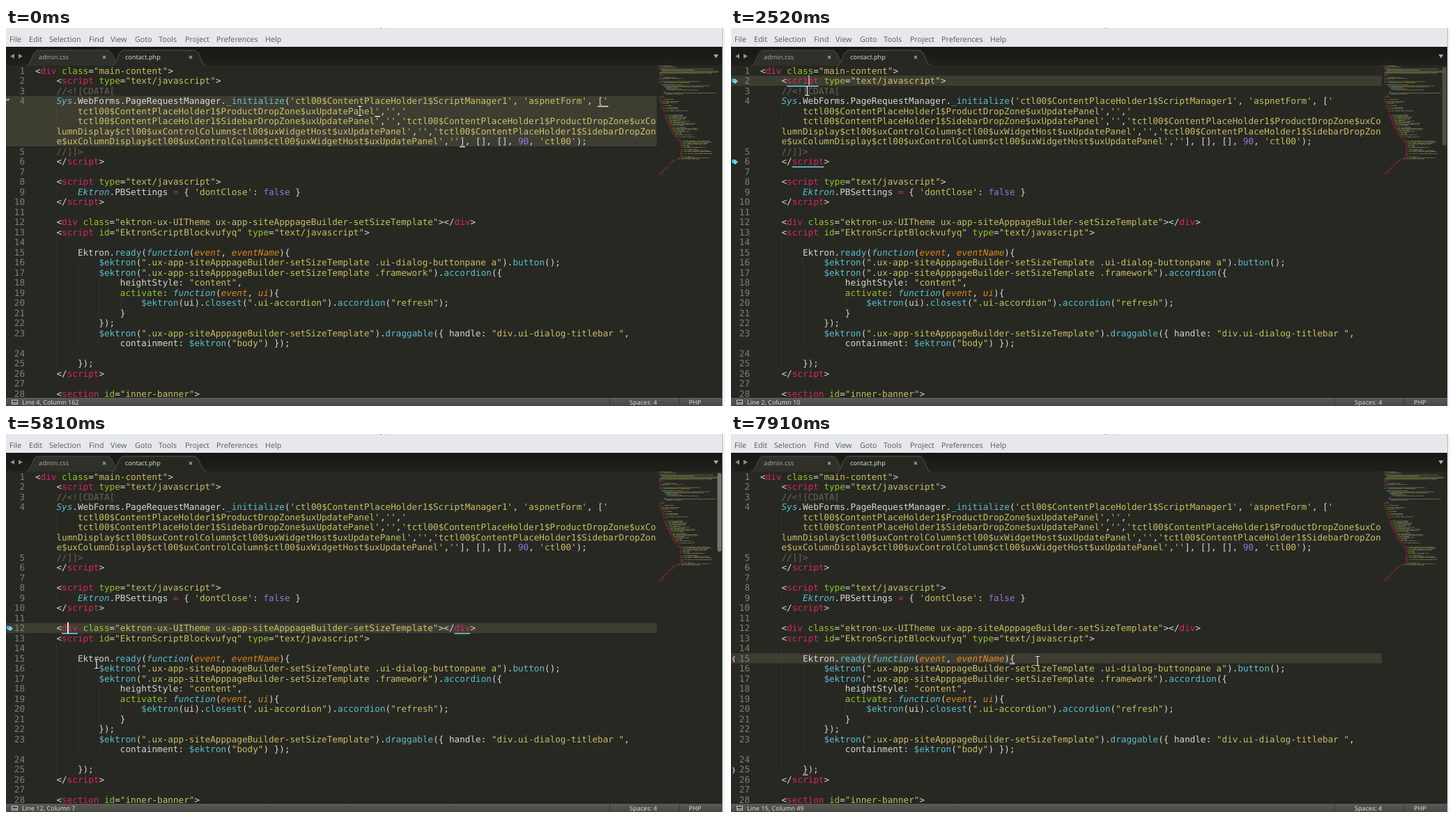
Recreate the animation shown at these times as an HTML page with a canvas. Size 1032 by 543 pixels, loop 8 s.

```html
<!DOCTYPE html>
<html lang="en">
<head>
<meta charset="utf-8">
<title>Code editor</title>
<style>
html, body { margin: 0; width: 100%; height: 100%; overflow: hidden; background: #272822; }
canvas { display: block; }
</style>
</head>
<body>
<canvas id="stage" width="1032" height="543"></canvas>
<script>
const ctx = document.getElementById('stage').getContext('2d');
const LOOP = 8000, TICK = 70;
const LEFT = 42, TOP = 54, ROW = 14.5, SIZE = 12.65, CELL = SIZE * 0.602;
const MENU_END = 27;
const MONO = '"DejaVu Sans Mono", monospace', SANS = '"Noto Sans", sans-serif';
const BACK = '#272822', BLUE = '#66d9ef';

// "~x" switches the colour; a leading "|" is a wrapped row without a number
const COLORS = {
  w: '#f8f8f2', p: '#f92672', g: '#a6e22e', y: '#e6db74', b: BLUE,
  i: BLUE, o: '#fd971f', u: '#ae81ff', c: '#75715e'
};
const SOURCE = `<~pdiv ~gclass~w=~y"main-content"~w>
    <~pscript ~gtype~w=~y"text/javascript"~w>
    ~c//<![CDATA[
    ~iSys~w.WebForms.PageRequestManager.~b_initialize~w(~y'ctl00$ContentPlaceHolder1$ScriptManager1'~w, ~y'aspnetForm'~w, [~y'
|        ~ytctl00$ContentPlaceHolder1$ProductDropZone$uxUpdatePanel'~w,~y''~w,~y'
|        ~ytctl00$ContentPlaceHolder1$SidebarDropZone$uxUpdatePanel'~w,~y''~w,~y'tctl00$ContentPlaceHolder1$ProductDropZone$uxCo
|    ~ylumnDisplay$ctl00$uxControlColumn$ctl00$uxWidgetHost$uxUpdatePanel'~w,~y''~w,~y'tctl00$ContentPlaceHolder1$SidebarDropZon
|    ~ye$uxColumnDisplay$ctl00$uxControlColumn$ctl00$uxWidgetHost$uxUpdatePanel'~w,~y''~w], [], [], ~u90~w, ~y'ctl00'~w);
    ~c//]]>
    </~pscript~w>

    <~pscript ~gtype~w=~y"text/javascript"~w>
        ~iEktron~w.PBSettings ~p=~w { ~y'dontClose'~w: ~ufalse~w }
    </~pscript~w>

    <~pdiv ~gclass~w=~y"ektron-ux-UITheme ux-app-siteApppageBuilder-setSizeTemplate"~w></~pdiv~w>
    <~pscript ~gid~w=~y"EktronScriptBlockvufyq" ~gtype~w=~y"text/javascript"~w>

        Ektron.~bready~w(~ifunction~w(~oevent~w, ~oeventName~w){
            ~b$ektron~w(~y".ux-app-siteApppageBuilder-setSizeTemplate .ui-dialog-buttonpane a"~w).~bbutton~w();
            ~b$ektron~w(~y".ux-app-siteApppageBuilder-setSizeTemplate .framework"~w).~baccordion~w({
                heightStyle: ~y"content"~w,
                ~gactivate~w: ~ifunction~w(~oevent~w, ~oui~w){
                    ~b$ektron~w(ui).~bclosest~w(~y".ui-accordion"~w).~baccordion~w(~y"refresh"~w);
                }
            });
            ~b$ektron~w(~y".ux-app-siteApppageBuilder-setSizeTemplate"~w).~bdraggable~w({ handle: ~y"div.ui-dialog-titlebar "~w,
|                containment: ~b$ektron~w(~y"body"~w) });

        });
    </~pscript~w>

    <~psection ~gid~w=~y"inner-banner"~w>`;

let lineNo = 0;
const rows = SOURCE.split('\n').map(raw => {
  const wrapped = raw[0] === '|';
  let col = 0;
  const parts = ('~w' + raw.slice(wrapped ? 1 : 0)).split('~').slice(1).map(s => {
    const part = { kind: s[0], text: s.slice(1), col };
    col += part.text.length;
    return part;
  });
  const text = parts.map(p => p.text).join('');
  return { parts, number: wrapped ? '' : String(++lineNo), indent: text.search(/\S/) };
});
for (let r = rows.length - 2; r >= 0; r--)
  if (rows[r].indent < 0) rows[r].indent = rows[r + 1].indent;

const TAG = 'tag', SOFT = '#b9cc9a', PINK = '#dfb0cd';
// marks are [row, column, length]; icons are [row, glyph]
const states = [
  { at: -70, line: 4, column: 162, row: 3, span: 5, caret: [4, 61], color: '#e4e8c0',
    marks: [[3, 106, 2], [4, 64, 1], [7, 80, 1]], icons: [[3, '‘’']], icon: SOFT },
  { at: 2030, line: 2, column: 10, row: 1, span: 1, caret: [1, 9], color: BLUE,
    marks: [[1, 5, 6], [9, 6, 6]], icons: [[1, TAG], [9, TAG]], icon: BLUE },
  { at: 3290, line: 8, column: 9, row: 11, span: 1, caret: [11, 8], color: BLUE,
    marks: [[11, 5, 6], [13, 6, 6]], icons: [[11, TAG], [13, TAG]], icon: BLUE },
  { at: 4620, line: 12, column: 7, row: 15, span: 1, caret: [15, 6], color: BLUE,
    marks: [[15, 5, 3], [15, 79, 3]], icons: [[15, TAG]], icon: BLUE },
  { at: 6370, line: 16, column: 51, row: 19, span: 1, caret: [19, 50], color: '#dfe6c4',
    marks: [[19, 19, 2], [19, 87, 2]], icons: [[19, '“”']], icon: SOFT },
  { at: 7280, line: 15, column: 49, row: 18, span: 1, caret: [18, 48], color: PINK,
    marks: [[18, 47, 1], [29, 8, 1]], icons: [[18, '{'], [29, '}']], icon: PINK }
];

// time, x, y
const path = [
  [0, 508, 119], [70, 508, 119], [140, 474, 118], [280, 440, 121], [980, 183, 139],
  [1120, 183, 139], [1890, 110, 78], [2380, 110, 78], [3150, 103, 216], [3640, 103, 216],
  [3950, 114, 241], [4270, 82, 275], [4479, 82, 275], [4480, 91, 279], [4760, 91, 279],
  [5320, 130, 303], [5530, 130, 303], [5810, 130, 330], [6230, 423, 340], [6930, 423, 340],
  [7210, 440, 326], [8000, 440, 326]
];

const clamp = v => Math.max(0, Math.min(1, v));
const ramp = (t, a, b) => clamp((t - a) / (b - a));
const rowTop = r => TOP + r * ROW;
const colX = c => LEFT + c * CELL;

function box(x, y, w, h, color) {
  ctx.fillStyle = color;
  ctx.fillRect(x, y, w, h);
}

function label(text, x, y, color, font) {
  ctx.font = font;
  ctx.fillStyle = color;
  ctx.fillText(text, x, y);
}

function shape(points, fill, stroke) {
  ctx.beginPath();
  points.forEach(([x, y]) => ctx.lineTo(x, y));
  ctx.closePath();
  if (fill) { ctx.fillStyle = fill; ctx.fill(); }
  if (stroke) { ctx.strokeStyle = stroke; ctx.lineWidth = 1; ctx.stroke(); }
}

function mouseAt(t) {
  const n = path.findIndex(p => p[0] > t);
  const [t0, x0, y0] = path[n - 1], [t1, x1, y1] = path[n];
  const k = ramp(t, t0, t1), e = k * k * (3 - 2 * k);
  return [x0 + (x1 - x0) * e, y0 + (y1 - y0) * e];
}

function drawMenu() {
  box(0, 0, 1032, MENU_END, '#e7e8eb');
  box(537, 0, 2, 1, '#8d9097');
  box(551, 0, 1, 1, '#8d9097');
  const menu = { File: 5, Edit: 33, Selection: 62, Find: 119, View: 150, Goto: 185,
    Tools: 219, Project: 257, Preferences: 302, Help: 372 };
  for (const name in menu) label(name, menu[name], 20, '#5c616c', '10.7px ' + SANS);
}

function drawTab(x, w, fill, edge) {
  ctx.beginPath();
  ctx.moveTo(x - 4, 54);
  ctx.bezierCurveTo(x + 4, 53, x + 4, 32, x + 13, 32);
  ctx.lineTo(x + w - 13, 32);
  ctx.bezierCurveTo(x + w - 4, 32, x + w - 4, 53, x + w + 4, 54);
  ctx.fillStyle = fill;
  ctx.fill();
  ctx.strokeStyle = edge;
  ctx.lineWidth = 1;
  ctx.stroke();
}

function drawTabs() {
  const shade = ctx.createLinearGradient(0, MENU_END, 0, 54);
  shade.addColorStop(0, '#171814');
  shade.addColorStop(1, '#20211c');
  box(0, MENU_END, 1032, 54 - MENU_END, shade);
  drawTab(33, 126, '#2f302a', '#494a43');
  drawTab(156, 127, BACK, '#55564e');
  label('admin.css', 47, 45, '#a3a49e', '9.2px ' + SANS);
  label('contact.php', 171, 45, '#d4d5cf', '9.1px ' + SANS);
  ctx.strokeStyle = '#a5a6a0';
  ctx.lineWidth = 1.2;
  for (const x of [141, 265]) {
    ctx.beginPath();
    ctx.moveTo(x - 2, 40); ctx.lineTo(x + 2, 44);
    ctx.moveTo(x + 2, 40); ctx.lineTo(x - 2, 44);
    ctx.stroke();
  }
  shape([[12, 37], [12, 44], [6, 40.5]], '#8c8d87');
  shape([[18, 37], [18, 44], [24, 40.5]], '#8c8d87');
  shape([[1015.5, 38], [1022.5, 38], [1019, 43.5]], '#a9aaa4');
}

function drawCode() {
  rows.forEach((row, r) => {
    const base = rowTop(r) + 11.6;
    for (let c = 4; c < row.indent; c += 4)
      box(Math.round(colX(c)), rowTop(r), 1, ROW, 'rgba(255,255,255,.05)');
    ctx.globalAlpha = 0.84;
    label(row.number, 27 - row.number.length * CELL, base, '#8f908a', SIZE + 'px ' + MONO);
    for (const p of row.parts) {
      const slant = 'io'.includes(p.kind) ? 'italic ' : '';
      label(p.text, colX(p.col), base, COLORS[p.kind], slant + SIZE + 'px ' + MONO);
    }
    ctx.globalAlpha = 1;
  });
}

function drawMinimap() {
  const x0 = 935, cell = 0.75, pitch = 1.5;
  let seed = 11;
  const rand = () => (seed = (seed * 16807) % 2147483647) / 2147483647;
  ctx.globalAlpha = 0.4;
  rows.forEach((row, r) => {
    for (const p of row.parts)
      for (const m of p.text.matchAll(/\S+/g))
        box(x0 + (p.col + m.index) * cell, TOP + r * pitch, m[0].length * cell, 0.9, COLORS[p.kind]);
  });
  const bends = [[33, 3], [42, 10], [52, 16], [66, 30], [74, 44], [87, 44], [90, 30], [105, 0]];
  for (let r = 33; r < 105; r++) {
    const n = bends.findIndex(b => b[0] > r), [a, b] = [bends[n - 1], bends[n]];
    const indent = a[1] + (b[1] - a[1]) * ramp(r, a[0], b[0]);
    const tail = r > 89;
    let x = x0 + indent * cell;
    const y = TOP + r * pitch, tag = 2 + rand() * 3;
    if (rand() < 0.12) continue;
    box(x, y, tag, 0.9, COLORS.p);
    x += tag + 1;
    if (tail || rand() < 0.35) continue;
    box(x, y, 4, 0.9, COLORS.g);
    const end = Math.min(1020, x + 8 + rand() * 34);
    for (x += 5; x < end;) {
      const w = 3 + rand() * 8;
      box(x, y, Math.min(w, end - x), 0.9, rand() < 0.6 ? COLORS.y : COLORS.w);
      x += w + 1;
    }
  }
  ctx.globalAlpha = 1;
}

function drawIcon([row, glyph], color) {
  const y = rowTop(row) + 7.5;
  if (glyph === TAG) {
    shape([[1.5, y - 3], [6, y - 3], [10, y + 0.5], [6, y + 4], [1.5, y + 1]], color);
    box(3, y - 1.8, 1.3, 1.3, BACK);
  } else {
    label(glyph, glyph.length > 1 ? 0 : 2, y + (glyph.length > 1 ? 5 : 3.5), color,
      'bold ' + (glyph.length > 1 ? 12 : 10) + 'px ' + SANS);
  }
}

function drawStatus(s) {
  const shade = ctx.createLinearGradient(0, 531, 0, 543);
  shade.addColorStop(0, '#5a5b56');
  shade.addColorStop(1, '#474843');
  box(0, 531, 1032, 12, shade);
  box(0, 530, 1032, 1, '#1b1c18');
  for (const x of [866, 966]) box(x, 531, 1, 12, '#383934');
  ctx.strokeStyle = '#c3c4be';
  ctx.lineWidth = 1;
  ctx.strokeRect(8.5, 534.5, 8, 6);
  box(9, 538, 7, 1, '#c3c4be');
  const font = '9.1px ' + SANS;
  label(`Line ${s.line}, Column ${s.column}`, 23, 541, '#d8d9d3', font);
  label('Spaces: 4', 895, 541, '#d8d9d3', font);
  label('PHP', 980, 541, '#d8d9d3', font);
}

function drawCaret(s, t) {
  const p = (t - s.at) % 1120;
  const alpha = p < 840 ? 1 - ramp(p, 350, 630) : ramp(p, 910, 1120);
  ctx.globalAlpha = alpha;
  box(Math.round(colX(s.caret[1])), rowTop(s.caret[0]) - 1, 1.8, 16, '#f8f8f0');
  ctx.globalAlpha = 1;
}

function drawScrollbar(t) {
  const pulse = 0.5 * ramp(t, 280, 420) * (1 - ramp(t, 770, 980));
  const shown = ramp(t, 2380, 2660) * (1 - ramp(t, 7210, 7350));
  ctx.globalAlpha = Math.max(pulse, shown);
  ctx.beginPath();
  ctx.roundRect(1021, 56, 6, 113, 3);
  ctx.fillStyle = '#73746e';
  ctx.fill();
  ctx.globalAlpha = 1;
}

function drawMouse(t) {
  const [x, y] = mouseAt(t);
  if (t >= 3150 && t < 4480) {
    const tip = [[0, 0], [0, 12], [3, 9.5], [5, 14.5], [7, 13.5], [5, 9], [8.5, 8.5]];
    shape(tip.map(([a, b]) => [x + a, y + b]), '#16170f', '#f6f6f2');
    return;
  }
  for (const [color, width] of [['#1b1c18', 2.6], ['#f4f4f0', 1.2]]) {
    ctx.strokeStyle = color;
    ctx.lineWidth = width;
    ctx.beginPath();
    ctx.moveTo(x - 3, y - 6.5); ctx.lineTo(x + 3, y - 6.5);
    ctx.moveTo(x, y - 6.5); ctx.lineTo(x, y + 6.5);
    ctx.moveTo(x - 3, y + 6.5); ctx.lineTo(x + 3, y + 6.5);
    ctx.stroke();
  }
}

function draw(t) {
  const s = states.filter(v => v.at <= t).pop();
  box(0, 0, 1032, 543, BACK);
  box(0, rowTop(s.row), 934, s.span * ROW, '#3e3d32');
  drawCode();
  for (const [r, c, n] of s.marks) box(colX(c), rowTop(r) + 14.3, n * CELL, 1.5, s.color);
  s.icons.forEach(i => drawIcon(i, s.icon));
  drawMinimap();
  drawScrollbar(t);
  drawCaret(s, t);
  drawMenu();
  drawTabs();
  drawStatus(s);
  box(1028, 0, 1, 543, '#b9bbbf');
  box(1029, 0, 3, 543, '#f3f4f5');
  drawMouse(t);
}

ctx.textRendering = 'geometricPrecision';
const start = performance.now();
let last = -1;
function loop() {
  const t = Math.floor(((performance.now() - start) % LOOP) / TICK) * TICK;
  if (t !== last) draw(last = t);
  requestAnimationFrame(loop);
}
loop();
</script>
</body>
</html>
```
